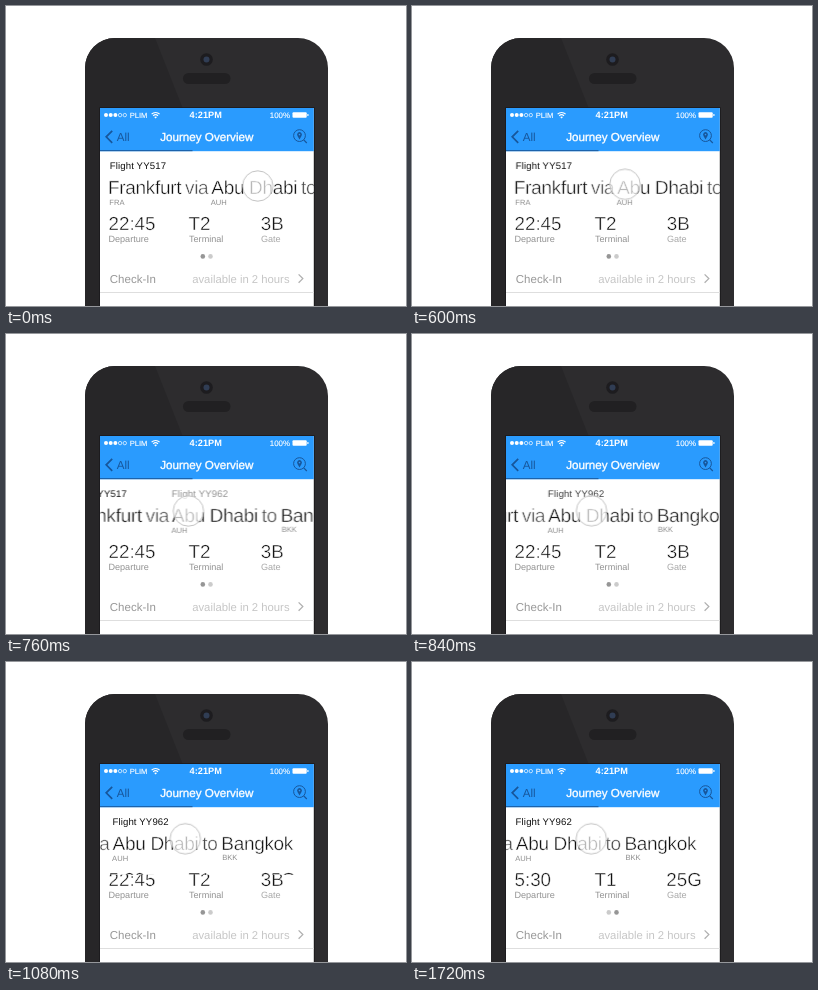
Recreate the animation shown at these times as an HTML page. Size 400 by 300 pixels, loop 1920 ms.

```html
<!DOCTYPE html>
<html lang="en">
<head>
<meta charset="utf-8">
<title>Journey Overview</title>
<style>
  html, body { margin: 0; width: 100%; height: 100%; overflow: hidden; background: #fff; }
  svg { display: block; width: 100%; height: 100%; }
  text { font-family: "Liberation Sans", Arial, sans-serif; text-rendering: geometricPrecision; }

  /* A thin white outline trims the strokes to a light weight. */
  .light { fill: #111; stroke: #fff; stroke-width: .46px; }
  .city { font-size: 19px; letter-spacing: -.32px; }
  .joint { fill: #4a4a4a; }
  .value { font-size: 18.8px; }
  .flight { font-size: 9.6px; letter-spacing: .14px; fill: #111; }
  .code { font-size: 7.6px; fill: #8c8c8c; }
  .label { font-size: 9.1px; fill: #929292; }
  .title { font-size: 11.65px; fill: #fff; stroke: #fff; stroke-width: .35px; }
  .navy { stroke: #17569b; fill: none; }

  .anim { animation: 1920ms linear infinite both; }
  .scroll { animation-name: scroll; }
  .appear { animation-name: appear; }
  .touch { animation-name: touch; }
  .wipe { animation-name: wipe; }
  .dim { animation-name: dim; }
  .lit { animation-name: lit; }

  @keyframes touch {
    0%, 16.3% { transform: translate(251.7px, 180px); animation-timing-function: cubic-bezier(.65, 0, .35, 1); }
    45.6%, 100% { transform: translate(179.3px, 176.8px); }
  }
  @keyframes scroll {
    0%, 31.25% { transform: translateX(0); }
    35.42% { transform: translateX(-12px); }
    39.58% { transform: translateX(-39px); }
    43.75% { transform: translateX(-69px); }
    47.92% { transform: translateX(-88px); }
    52.08% { transform: translateX(-95.5px); }
    56.25% { transform: translateX(-98.7px); }
    62.5% { transform: translateX(-100.8px); }
    68.75%, 100% { transform: translateX(-101.5px); }
  }
  @keyframes appear {
    0%, 34% { opacity: 0; }
    46%, 100% { opacity: 1; }
  }
  @keyframes wipe {
    0%, 54.17% { transform: translateY(0); }
    66.67%, 100% { transform: translateY(16px); }
  }
  @keyframes dim {
    0%, 62.5% { fill: #969696; }
    77%, 100% { fill: #cbcbcb; }
  }
  @keyframes lit {
    0%, 62.5% { fill: #cbcbcb; }
    77%, 100% { fill: #969696; }
  }
</style>
</head>
<body>
<svg viewBox="0 0 400 300">
  <defs>
    <clipPath id="screen"><rect x="94" y="102" width="213.8" height="198"/></clipPath>
    <clipPath id="reveal"><rect class="anim wipe" x="94" y="190" width="214" height="20"/></clipPath>
  </defs>

  <!-- Phone -->
  <rect x="79" y="32" width="243" height="340" rx="30" fill="#2d2c2e"/>
  <path d="M79 300V62a30 30 0 0 1 30-30H149L177 103V300z" fill="#272628"/>
  <circle cx="200.5" cy="53.5" r="6.3" fill="#1d1c1f"/>
  <circle cx="200.5" cy="53.5" r="3" fill="#303d54"/>
  <rect x="177" y="67" width="47.5" height="11" rx="5.5" fill="#212022"/>
  <rect x="93.3" y="101.3" width="215.4" height="210" fill="#19181a"/>

  <g clip-path="url(#screen)">
    <rect x="93" y="102" width="217" height="198" fill="#fff"/>
    <rect x="93" y="102" width="217" height="43.2" fill="#2a9bfe"/>
    <rect x="93" y="144" width="93.5" height="1.2" fill="#1c63ab"/>

    <!-- Status bar -->
    <g fill="#fff">
      <circle cx="100" cy="109.1" r="2"/>
      <circle cx="104.7" cy="109.1" r="2"/>
      <circle cx="109.4" cy="109.1" r="2"/>
      <g fill="none" stroke="#fff" stroke-width=".7">
        <circle cx="114.1" cy="109.1" r="1.7"/>
        <circle cx="118.8" cy="109.1" r="1.7"/>
      </g>
      <text x="123.7" y="111.9" font-size="7.6" stroke="#fff" stroke-width=".15">PLIM</text>
      <path d="M145.6 108.2a5.6 5.6 0 0 1 8 0M147.2 109.9a3.4 3.4 0 0 1 4.8 0" fill="none" stroke="#fff" stroke-width="1.2"/>
      <path d="M148.2 111.1a2 2 0 0 1 2.8 0L149.6 112.6z"/>
      <text x="199.7" y="112.1" font-size="9.2" font-weight="bold" text-anchor="middle">4:21PM</text>
      <text x="263.8" y="111.9" font-size="7.9" stroke="#fff" stroke-width=".15">100%</text>
      <rect x="286.5" y="106.3" width="14.2" height="5.4" rx="1"/>
      <rect x="301.3" y="107.9" width="1.2" height="2.2" rx=".5"/>
    </g>

    <!-- Navigation bar -->
    <path class="navy" d="M106.2 124.8L100.2 130.8L106.2 136.8" stroke-width="1.7"/>
    <text x="110.8" y="134.8" font-size="11.6" fill="#17569b">All</text>
    <text class="title" x="200.8" y="134.7" text-anchor="middle">Journey Overview</text>
    <circle class="navy" cx="293.5" cy="129.6" r="5.9" stroke-width="1"/>
    <path class="navy" d="M297.7 133.9L300.8 137" stroke-width="1.2"/>
    <path d="M293.5 133.4l-2-3.5a2.4 2.4 0 1 1 4 0z" fill="#17569b"/>
    <circle cx="293.5" cy="128.6" r=".8" fill="#2a9bfe"/>

    <!-- Route -->
    <g class="anim scroll">
      <text class="flight" x="103.7" y="163.3">Flight YY517</text>
      <text class="flight anim appear" x="205.1" y="163.3">Flight YY962</text>
      <g class="light city">
        <text x="102" y="188.3">Frankfurt</text>
        <text class="joint" x="179" y="188.3">via</text>
        <text x="205.3" y="188.3">Abu Dhabi</text>
        <text class="joint" x="295" y="188.3">to</text>
        <text x="314" y="188.3">Bangkok</text>
      </g>
      <text class="code" x="103.3" y="199.2">FRA</text>
      <text class="code" x="204.8" y="199.2">AUH</text>
      <text class="code" x="314.9" y="198.4">BKK</text>
    </g>

    <!-- Values, replaced from the top down -->
    <g class="light value">
      <text x="102.5" y="224">22:45</text>
      <text x="182.6" y="224">T2</text>
      <text x="254.7" y="224">3B</text>
    </g>
    <g class="light value" clip-path="url(#reveal)">
      <rect x="95" y="207" width="212" height="19" fill="#fff" stroke="none"/>
      <text x="102.5" y="224">5:30</text>
      <text x="182.6" y="224">T1</text>
      <text x="254.3" y="224">25G</text>
    </g>
    <g class="label">
      <text x="102.4" y="236.3">Departure</text>
      <text x="183" y="236.3">Terminal</text>
      <text x="254.9" y="236.3" fill="#a8a8a8">Gate</text>
    </g>

    <circle class="anim dim" cx="196.8" cy="250.4" r="2.3"/>
    <circle class="anim lit" cx="204.5" cy="250.4" r="2.3"/>

    <text x="103.8" y="276.5" font-size="11.5" fill="#989898">Check-In</text>
    <text x="186.2" y="276.5" font-size="11.3" fill="#c6c6c6">available in 2 hours</text>
    <path d="M292.6 268.4L296.8 272.6L292.6 276.8" fill="none" stroke="#b0b0b0" stroke-width="1.3"/>
    <rect x="93" y="286" width="217" height="1" fill="#dedede"/>

    <g class="anim touch">
      <circle r="15.2" fill="#fff" fill-opacity=".7" stroke="#c2c2c2"/>
    </g>
  </g>
</svg>
</body>
</html>
```
